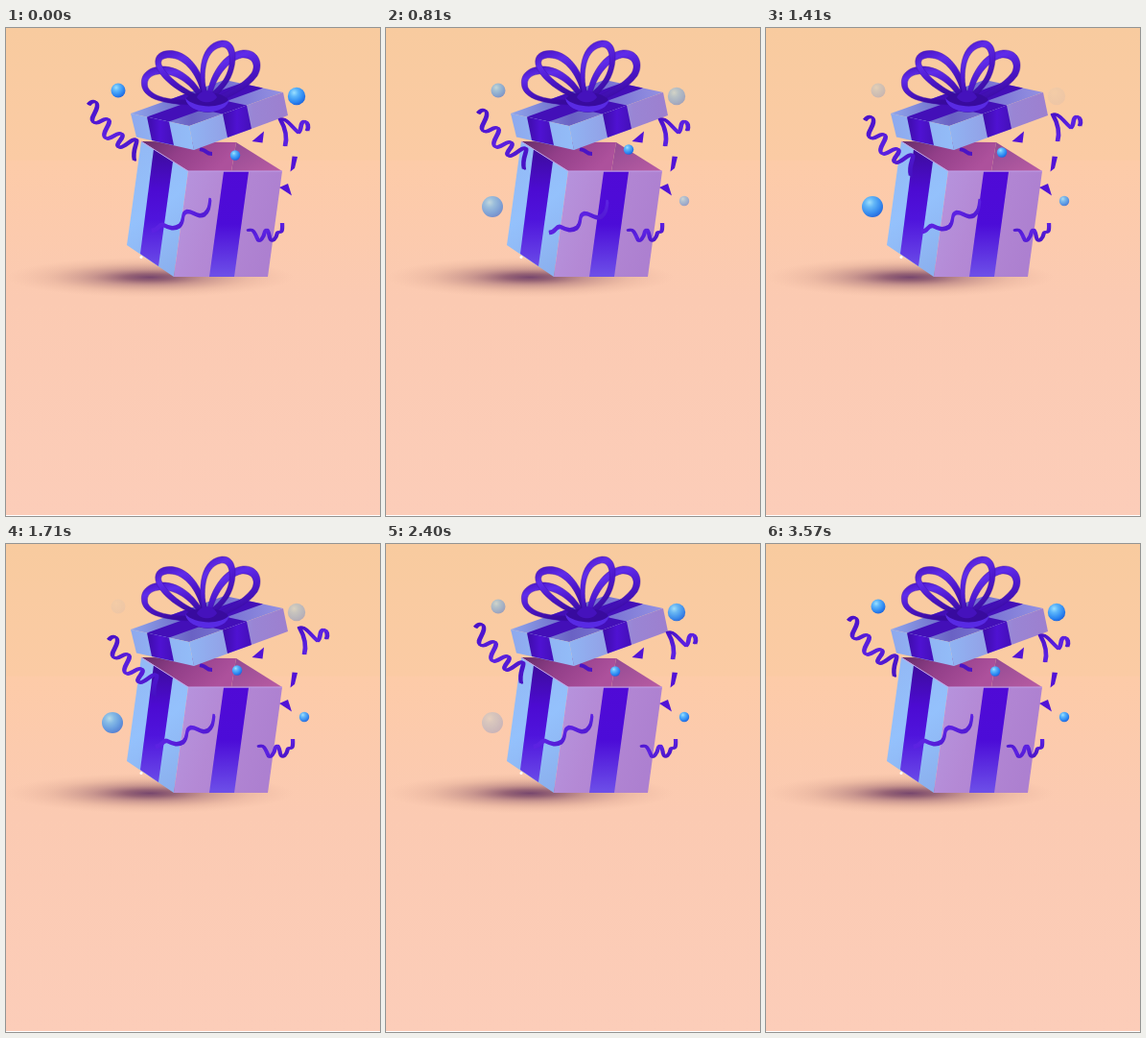
An HTML page that plays this animation: 390 by 508 pixels, repeating every 4.6 s.

```html
<!DOCTYPE html>
<html lang="en">
<head>
<meta charset="utf-8">
<title>Gift box</title>
<style>
html, body { margin: 0; width: 100%; height: 100%; overflow: hidden; background: #fbcbb0; }
svg { display: block; width: 100vw; height: 100vh; }
.curl { fill: none; stroke: url(#curl); stroke-width: 2.3; stroke-linejoin: round; }
.loop { fill-rule: evenodd; stroke: #3a0ba4; stroke-width: .4; }
</style>
</head>
<body>
<svg viewBox="0 0 390 508" preserveAspectRatio="none">
  <defs>
    <linearGradient id="sky" x2="0" y2="1">
      <stop offset="0" stop-color="#f8cb9f"/>
      <stop offset=".27" stop-color="#fbcba4"/>
      <stop offset=".272" stop-color="#fdcba8"/>
      <stop offset=".56" stop-color="#fbcab2"/>
      <stop offset="1" stop-color="#fccdb9"/>
    </linearGradient>
    <radialGradient id="shadow">
      <stop offset="0" stop-color="#70406a" stop-opacity=".95"/>
      <stop offset=".17" stop-color="#7f4c68" stop-opacity=".82"/>
      <stop offset=".4" stop-color="#9a6570" stop-opacity=".5"/>
      <stop offset=".7" stop-color="#bb8479" stop-opacity=".2"/>
      <stop offset="1" stop-color="#d8a28c" stop-opacity="0"/>
    </radialGradient>
    <radialGradient id="ball" cx=".36" cy=".3" r=".75">
      <stop offset="0" stop-color="#9be0ff"/>
      <stop offset=".3" stop-color="#5cb6fb"/>
      <stop offset=".7" stop-color="#2f8af2"/>
      <stop offset="1" stop-color="#1b62dc"/>
    </radialGradient>
    <linearGradient id="side" x1=".3" x2=".6" y2="1">
      <stop offset="0" stop-color="#93b9f5"/>
      <stop offset=".5" stop-color="#94c1fc"/>
      <stop offset="1" stop-color="#8bb0ee"/>
    </linearGradient>
    <linearGradient id="front" x2="1" y2=".3">
      <stop offset="0" stop-color="#b796df"/>
      <stop offset=".45" stop-color="#b489d5"/>
      <stop offset="1" stop-color="#ad80d0"/>
    </linearGradient>
    <linearGradient id="sideBand" x2="0" y2="1">
      <stop offset="0" stop-color="#3d0c9c"/>
      <stop offset=".35" stop-color="#4c0bd2"/>
      <stop offset=".6" stop-color="#4f14dc"/>
      <stop offset="1" stop-color="#6a4ae8"/>
    </linearGradient>
    <linearGradient id="frontBand" x2="0" y2="1">
      <stop offset="0" stop-color="#500ad6"/>
      <stop offset=".5" stop-color="#4c0cd8"/>
      <stop offset="1" stop-color="#6d50e8"/>
    </linearGradient>
    <linearGradient id="lidBand" x2="1">
      <stop offset="0" stop-color="#3d0ca8"/>
      <stop offset=".5" stop-color="#4f12d2"/>
      <stop offset="1" stop-color="#4410b8"/>
    </linearGradient>
    <linearGradient id="inside" x2="1" y2=".3">
      <stop offset="0" stop-color="#652c6a"/>
      <stop offset=".45" stop-color="#933f89"/>
      <stop offset="1" stop-color="#ad519c"/>
    </linearGradient>
    <linearGradient id="wall" x2="1" y2="1">
      <stop offset="0" stop-color="#924a92"/>
      <stop offset="1" stop-color="#b95ca3"/>
    </linearGradient>
    <linearGradient id="lidTop" x2="1">
      <stop offset="0" stop-color="#8fa6ec"/>
      <stop offset=".4" stop-color="#6a62c4"/>
      <stop offset=".7" stop-color="#7d78d6"/>
      <stop offset="1" stop-color="#9592e2"/>
    </linearGradient>
    <linearGradient id="lidSide" x2="1">
      <stop offset="0" stop-color="#8ea9ee"/>
      <stop offset="1" stop-color="#93bdf8"/>
    </linearGradient>
    <linearGradient id="lidFront" x2="1">
      <stop offset="0" stop-color="#90b4f3"/>
      <stop offset=".4" stop-color="#93a0e6"/>
      <stop offset=".65" stop-color="#9a85d4"/>
      <stop offset="1" stop-color="#9d80cf"/>
    </linearGradient>
    <linearGradient id="bow" x2=".4" y2="1">
      <stop offset="0" stop-color="#4612bc"/>
      <stop offset=".3" stop-color="#5f2cea"/>
      <stop offset=".6" stop-color="#4d17cc"/>
      <stop offset="1" stop-color="#380b9c"/>
    </linearGradient>
    <linearGradient id="curl" x2="1" y2="1">
      <stop offset="0" stop-color="#4810c8"/>
      <stop offset=".5" stop-color="#5c22e2"/>
      <stop offset="1" stop-color="#440fc0"/>
    </linearGradient>
  </defs>

  <rect width="390" height="508" fill="url(#sky)"/>
  <rect y="507" width="390" height="1" fill="#fff"/>
  <ellipse cx="150" cy="259.500" rx="150" ry="21" fill="url(#shadow)"/>

  <!-- box -->
  <path d="M141 118L240 119L235 149H190Z" fill="url(#inside)"/>
  <path d="M240 119L288 149H235Z" fill="url(#wall)"/>
  <path d="M202 126Q207 127 209 129T215 131" fill="none" stroke="#4c14c4" stroke-width="4"/>
  <path d="M141 118L190 149L175 259L126 226Z" fill="url(#side)"/>
  <path d="M190 149H288L273 259H175Z" fill="url(#front)"/>
  <path d="M154 126L174 139L159 248L140 235Z" fill="url(#sideBand)"/>
  <path d="M227 149.500H253L238 259H212Z" fill="url(#frontBand)"/>
  <path d="M141 118L190 149H288" fill="none" stroke="#c0a2e8"/>
  <circle cx="141" cy="238.500" r="1.500" fill="#fff"/>

  <!-- lid -->
  <path d="M130 89L191 102L289 67L228 54Z" fill="url(#lidTop)"/>
  <path d="M147 92.600L170 97.500L268 62.500L245 57.600Z" fill="#430fb8"/>
  <path d="M226 89.500L251 80.600L190 67.600L165 76.500Z" fill="#430fb8"/>
  <path d="M130 89L191 102L196 127L136 113.500Z" fill="url(#lidSide)"/>
  <path d="M191 102L289 67L294 91L196 127Z" fill="url(#lidFront)"/>
  <path d="M147 92.600L170 97.500L175 122L152 117Z" fill="url(#lidBand)"/>
  <path d="M226 89.500L251 80.600L256 105L231 114Z" fill="url(#lidBand)"/>

  <g id="bow-loops" fill="url(#bow)"></g>
  <path d="M187 74C192 66 224 64 232 75C228 92 192 92 187 74Z" fill="#380b9e"/>
  <path d="M187 73C190 92 230 92 233 74C225 84 197 84 187 73Z" fill="#582ae4"/>
  <path d="M199 72C203 63 216 63 220 72C216 79 203 79 199 72Z" fill="#4512bc"/>

  <!-- confetti -->
  <g fill="#5213d6">
    <path d="M256.500 118L269 107.500L267.500 119.500Z"/>
    <path d="M285 166L294 162L298 174.500Z"/>
    <path d="M298.500 133.500L304 134L301 146L296.500 149.500Z"/>
  </g>
  <g id="moving"></g>
</svg>
<script>
const LOOP = 4600, STEP = 30, LAST = 3570;
const NS = "http://www.w3.org/2000/svg";
const $ = id => document.getElementById(id);

function add(parent, tag, attrs) {
  const el = document.createElementNS(NS, tag);
  for (const key in attrs) el.setAttribute(key, attrs[key]);
  return parent.appendChild(el);
}

// Each loop is an outer teardrop with a smaller one cut out.
const loops = [
  "M207 80C185 80 148 80 142 62C138 46 152 39 166 40C188 42 203 62 209 77Z M203 75C185 75 156 76 148 62C145 51 155 47 166 48C184 50 196 64 203 75Z",
  "M208 77C186 72 160 54 156 38C154 26 165 22 176 24C197 28 209 55 211 76Z M204 71C188 66 167 50 162 38C160 31 169 30 177 32C192 37 202 56 204 71Z",
  "M209 78C209 58 222 26 247 23C264 22 269 38 262 50C252 64 232 72 214 80Z M214 74C216 58 228 35 246 31C257 30 261 39 256 47C247 59 230 67 214 74Z",
  "M207 77C200 55 199 16 225 13C243 12 241 38 234 52C229 62 220 70 213 77Z M210 71C205 52 206 24 224 20C235 18 235 38 230 48C226 58 217 65 210 71Z"
];
for (const d of loops) add($("bow-loops"), "path", { d, class: "loop" });

// Keys are [time, value...]; values run linearly between them.
function track(keys, t) {
  let i = 0;
  while (i < keys.length && keys[i][0] <= t) i++;
  if (i === 0) return keys[0].slice(1);
  if (i === keys.length) return keys[i - 1].slice(1);
  const a = keys[i - 1], b = keys[i];
  const p = (t - a[0]) / (b[0] - a[0]);
  return a.slice(1).map((v, n) => v + (b[n + 1] - v) * p);
}

const curls = [
  { d: "M86 80C90 75 96 75 95 82C94 89 87 94 91 98C96 102 102 92 107 95C111 99 99 109 103 114C107 119 116 107 121 110C125 114 113 120 117 124C122 127 131 114 136 116C138 119 131 127 134 138",
    pen: [1.1, .5], keys: [[0, 0, 0], [1800, 22, 21], [2700, 0, 0]] },
  { d: "M152 211C160 211 158 204 164 205C170 208 175 210 181 206C187 200 182 193 189 191C196 191 200 198 207 194C212 190 212 185 213 178",
    pen: [.3, 1.2], keys: [[0, 0, 0], [900, 20, 2], [1800, 2, 0]] },
  { d: "M291 123C294 112 290 102 286 95C292 93 298 103 305 109C309 106 306 98 311 97C315 98 316 103 314 107",
    pen: [1.2, 0], keys: [[900, 0, 0], [1800, 22.5, -9], [2700, 0, 0]] },
  { d: "M252 211C257 208 259 212 262 219C264 226 269 217 270 212C272 207 274 212 275 218C277 226 282 218 283 213C284 210 289 218 288 203",
    pen: [1, 0], keys: [[900, 0, 0], [1800, 12, 0], [2300, 14.2, 0], [2700, 11.7, 0], [3600, 0, 0]] }
];
const balls = [
  { at: [117, 65, 7.5], fade: [[0, 1], [1800, 0], [3200, 1]] },
  { at: [303, 71, 9.2], fade: [[0, 1], [1350, 0], [2500, 1]] },
  { at: [111, 186, 11], fade: [[0, 0], [1350, 1], [2700, 0]] },
  { at: [311, 180, 5.2], fade: [[0, 0], [1800, 1]] },
  { at: [239, 132.5, 5.2], keys: [[0, 0, 0], [900, 16, -7], [1800, 0, 0]] }
];

// A flat pen: shifted thin strokes widen the arms and keep the turns thin.
for (const c of curls) {
  c.el = add($("moving"), "g", {});
  for (const k of [-1, 0, 1]) {
    add(c.el, "path", { d: c.d, class: "curl", transform: `translate(${k * c.pen[0]} ${k * c.pen[1]})` });
  }
}
for (const b of balls) {
  const [cx, cy, r] = b.at;
  b.el = add($("moving"), "circle", { cx, cy, r, fill: "url(#ball)" });
}

function draw(now) {
  const t = Math.min(LAST, Math.floor((now % LOOP) / STEP) * STEP);
  for (const part of [...curls, ...balls]) {
    if (part.keys) {
      const [x, y] = track(part.keys, t).map(Math.round);
      part.el.setAttribute("transform", `translate(${x} ${y})`);
    }
    if (part.fade) part.el.setAttribute("opacity", track(part.fade, t)[0]);
  }
}

let start = null;
function tick(now) {
  if (start === null) start = now;
  draw(Math.max(0, now - start));
  requestAnimationFrame(tick);
}
draw(0);
requestAnimationFrame(tick);
</script>
</body>
</html>
```
